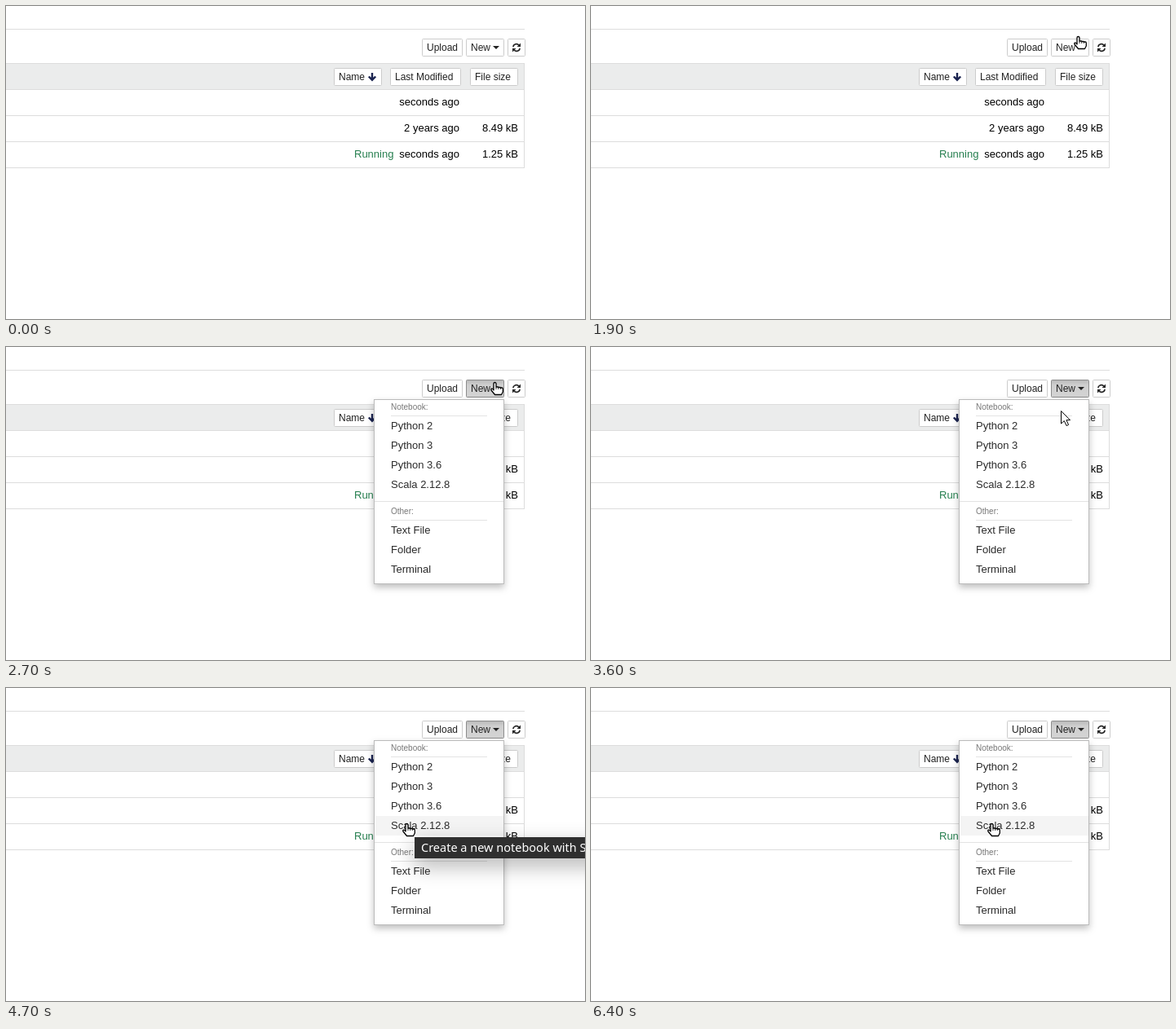
Write an HTML page that moves like this. It is 710 px wide and 384 px high and loops after 6.8 s.

```html
<!DOCTYPE html>
<html lang="en">
<head>
<meta charset="utf-8">
<title>Notebook menu</title>
<style>
  html, body { margin: 0; width: 100%; height: 100%; overflow: hidden; background: #fff; }
  svg { display: block; }
  text { font: 13px "Liberation Sans", Arial, sans-serif; fill: #000; white-space: pre; }
  .label { font-size: 12px; fill: #222; }
  .item { fill: #2b2b2b; }
  .heading { font-size: 10px; fill: #777; }
  .end { text-anchor: end; }
  .running { fill: #267f4f; }
  .tip { font: 14.5px "Noto Sans", "Open Sans", sans-serif; fill: #fff; }
  .line { fill: #ddd; }
  .rule { fill: #e3e3e3; }
  .button { fill: #fff; stroke: #ccc; }
  .button.hover { fill: #e6e6e6; stroke: #adadad; }
  .button.pressed { fill: url(#pressed); stroke: #8c8c8c; }
  .panel { fill: #fff; stroke: #bbb; filter: drop-shadow(0 4px 4px rgba(0, 0, 0, .25)); }
  .tipBox { fill: #2f2f2f; filter: drop-shadow(0 9px 13px rgba(0, 0, 0, .3)); }
  .cursor { fill: #fff; stroke: #000; stroke-linejoin: round; }
</style>
</head>
<body>
<svg id="stage" width="710" height="384" viewBox="0 0 710 384">
  <defs>
    <linearGradient id="pressed" x2="0" y2="1">
      <stop offset="0" stop-color="#b9b9b9"/>
      <stop offset=".3" stop-color="#cfcfcf"/>
      <stop offset="1" stop-color="#d4d4d4"/>
    </linearGradient>
  </defs>
  <g id="page"></g>
  <g id="menu"></g>
  <g id="tooltip"></g>
  <path id="arrow" class="cursor" d="M.5.5V16l3.8-3.4 2.8 6 2.5-1.2-2.7-5.7H11.5Z"/>
  <g id="hand" class="cursor">
    <path stroke-width="1.3" d="M4 10V2a1.5 1.5 0 0 1 3 0V6H9.5L10 6.5H12L12.5 7H14Q15.3 7 15.3 8.5V12L13.5 15.5H5.5L1 10Q.3 8.5 1.6 8.2T4 10Z"/>
    <path stroke-width=".8" fill="none" d="M7 6V9M9.7 6.5V9M12.3 7V9"/>
  </g>
</svg>
<script>
const LOOP = 6800;
const $ = id => document.getElementById(id);

function add(parent, tag, attrs, content = "") {
  const node = document.createElementNS("http://www.w3.org/2000/svg", tag);
  for (const key in attrs) node.setAttribute(key, attrs[key]);
  node.textContent = content;
  return $(parent).appendChild(node);
}
const rect = (parent, x, y, width, height, cls, extra) =>
  add(parent, "rect", { x, y, width, height, class: cls, ...extra });
const text = (parent, x, y, content, cls = "") =>
  add(parent, "text", { x, y, class: cls }, content);
const path = (parent, d, attrs) => add(parent, "path", { d, ...attrs });

function button(x, y, width, label) {
  const box = rect("page", x + .5, y + .5, width - 1, 21, "button", { rx: 1 });
  text("page", x + 6, y + 15, label, "label");
  return box;
}

// File list
const rowTops = [103, 135, 167];
rect("page", 0, 28, 636, 1, "line");
rect("page", 0, 70, 636, 32, "", { fill: "#ebecec" });
const rowHover = rect("page", 0, 0, 635, 31, "", { fill: "#f8f8f8" });
[70, 102, 134, 166, 198].forEach(y => rect("page", 0, y, 636, 1, "line"));
rect("page", 635, 70, 1, 129, "line");
["seconds ago", "2 years ago", "seconds ago"].forEach((age, i) =>
  text("page", 556, 122 + 32 * i, age, "end"));
text("page", 628, 154, "8.49 kB", "end");
text("page", 628, 186, "1.25 kB", "end");
text("page", 427, 186, "Running", "running");

// Buttons and their icons
button(510, 40, 50, "Upload");
const newButton = button(564, 40, 47, "New");
button(615, 40, 22, "");
button(402, 76, 59, "Name");
button(471, 76, 87, "Last Modified");
button(569, 76, 59, "File size");
path("page", "M597 49h8l-4 4Z", { fill: "#222" });
path("page", "M449 82V90M444.8 86.5L449 90.7 453.2 86.5",
  { fill: "none", stroke: "#1b2450", "stroke-width": 2.4 });
path("page", "M621.8 50A4.2 4.2 0 0 1 629 48M630.2 52A4.2 4.2 0 0 1 623 54",
  { fill: "none", stroke: "#222", "stroke-width": 1.7 });
path("page", "M631 45.5V50H626.5ZM621 56.5V52H625.5Z", { fill: "#222" });

// Drop-down menu
rect("menu", 451.5, 64.5, 159, 226, "panel");
const itemHover = rect("menu", 453, 0, 157, 24, "", { fill: "#f4f4f4" });
function section(y, heading, items) {
  text("menu", 472, y, heading, "heading");
  rect("menu", 472, y + 7, 118, 1, "rule");
  items.forEach((item, i) => text("menu", 472, y + 24 * (i + 1), item, "item"));
}
section(77, "Notebook:", ["Python 2", "Python 3", "Python 3.6", "Scala 2.12.8"]);
rect("menu", 452, 189, 158, 1, "rule");
section(205, "Other:", ["Text File", "Folder", "Terminal"]);

rect("tooltip", 501, 183, 300, 26, "tipBox");
text("tooltip", 509, 201, "Create a new notebook with Scala 2.12.8", "tip");

// Pointer steps: time, x, y, shape
const steps = [
  [0, 0, 0, ""],
  [800, 18, 178, "arrow"], [900, 106, 161, "arrow"], [1000, 196, 145, "arrow"],
  [1100, 270, 126, "arrow"], [1200, 335, 107, "arrow"], [1300, 386, 92, "arrow"],
  [1400, 416, 84, "arrow"], [1500, 440, 77, "arrow"], [1600, 495, 58, "arrow"],
  [1700, 552, 37, "arrow"], [1800, 582, 30, "arrow"], [1900, 592, 37, "hand"],
  [2000, 594, 42, "hand"], [2100, 594, 43, "hand"],
  [3400, 592, 47, "hand"], [3500, 586, 58, "hand"], [3600, 576, 78, "arrow"],
  [3700, 565, 101, "hand"], [3800, 553, 124, "hand"], [3900, 543, 144, "hand"],
  [4000, 537, 155, "hand"], [4100, 533, 161, "hand"], [4200, 513, 165, "hand"],
  [4300, 496, 167, "hand"], [4400, 488, 166, "hand"], [4500, 486, 166, "hand"],
];
const tipSteps = [[0, 0], [4600, .5], [4700, 1], [6200, .65], [6300, .3], [6400, 0]];
const stepAt = (table, t) => table.findLast(step => step[0] <= t);
const show = (node, on) => node.style.display = on ? "" : "none";

function draw(t) {
  const [, x, y, shape] = stepAt(steps, t);
  for (const id of ["arrow", "hand"]) {
    $(id).setAttribute("transform", `translate(${x} ${y})`);
    show($(id), shape === id);
  }

  const row = rowTops.find(top => y >= top && y < top + 32);
  show(rowHover, t < 2700 && row);
  if (row) rowHover.setAttribute("y", row);

  const menuOpen = t >= 2700;
  const item = Math.floor((y + 1 - 85) / 24);
  show($("menu"), menuOpen);
  show(itemHover, menuOpen && item >= 0);
  itemHover.setAttribute("y", 85 + 24 * item);

  const state = t >= 2600 ? "pressed" : t >= 2000 ? "hover" : "";
  newButton.setAttribute("class", "button " + state);
  $("tooltip").setAttribute("opacity", stepAt(tipSteps, t)[1]);
}

const start = performance.now();
function tick() {
  draw((performance.now() - start) % LOOP);
  requestAnimationFrame(tick);
}
tick();
</script>
</body>
</html>
```
